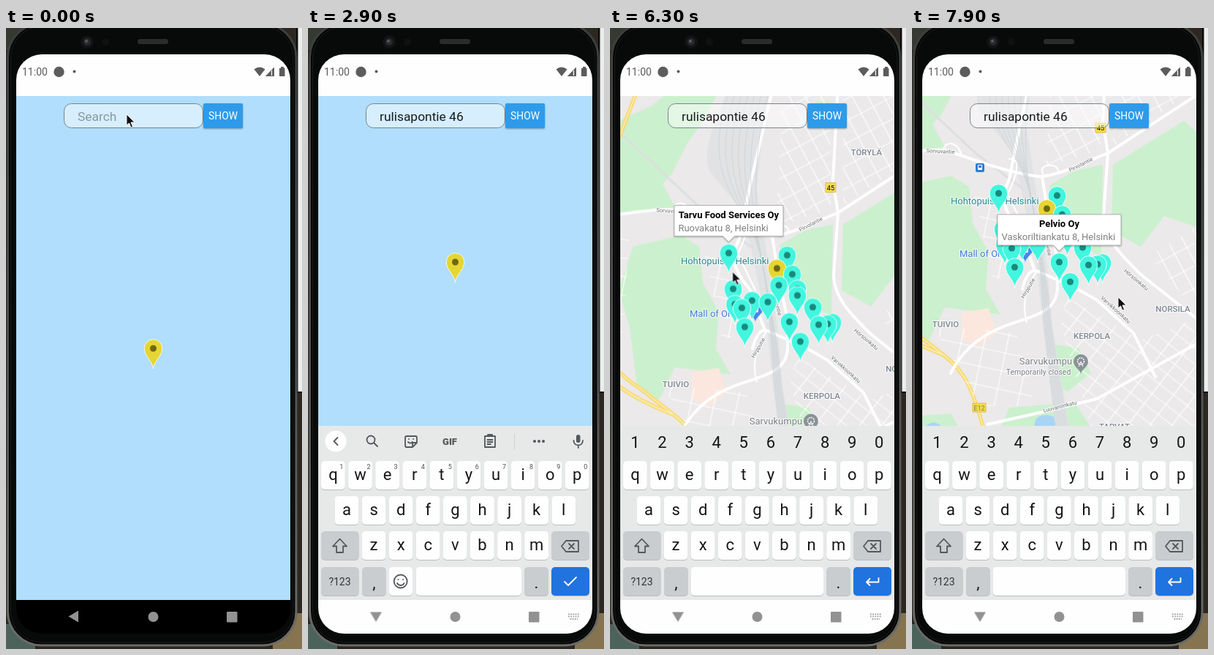
Recreate the animation shown at these times as an HTML page. Size 405 by 849 pixels, loop 8000 ms.

```html
<!DOCTYPE html>
<html lang="en">
<head>
<meta charset="utf-8">
<title>Map search on a phone</title>
<style>
html, body { margin: 0; height: 100%; overflow: hidden; background: #111; }
svg { display: block; width: 100%; height: 100%; }
text { font-family: Roboto, "Noto Sans", sans-serif; white-space: pre; }
.mid { text-anchor: middle; }
.line { fill: none; stroke-linecap: round; stroke-linejoin: round; }

.key { fill: #fefefe; filter: drop-shadow(0 1px 0 #b9bcbe); }
.key.alt { fill: #c9cdd0; }
.key.go { fill: #2173df; }
.letter { font-size: 22px; fill: #161616; text-anchor: middle; }
.hint { font-size: 9px; fill: #4c4f52; text-anchor: middle; }
.icon { fill: none; stroke: #54585b; stroke-width: 1.8; stroke-linecap: round; stroke-linejoin: round; }
.icon.light { stroke: #fff; }
.word { font-size: 14px; fill: #333; text-anchor: middle; }

.road { stroke: #fff; stroke-width: 4; }
.slim { stroke-width: 2.2; }
.motorway { stroke: #f9da72; stroke-width: 5.5; }
.median { stroke: #fdf1c4; stroke-width: 1.2; }
.label { paint-order: stroke; stroke: #fffc; stroke-width: 2px; text-anchor: middle; }
.area { font-size: 11.5px; font-weight: 500; fill: #7b8691; }
.street { font-size: 7.5px; fill: #666b70; }
.place { font-size: 13px; text-anchor: start; }

.loop { animation: 8s linear infinite; }
.pan { animation-name: pan; }
.keyboard { animation-name: slide; }
.back { animation-name: turn; transform-origin: 93px 804.5px; }
.pointer { animation-name: point; }
.land { animation-name: land; }
.features { animation-name: features; }
.poi { animation-name: poi; }
.fine { animation-name: fine; }

@keyframes pan {
  0%, 73.9% { transform: translate(0, 0); animation-timing-function: ease-in-out; }
  84.8%, 91.4% { transform: translate(66px, 21px); animation-timing-function: ease-in-out; }
  98.5%, 100% { transform: translate(-17px, -73px); }
}
@keyframes slide {
  0%, 2% { transform: translateY(238px); animation-timing-function: ease-out; }
  4.8%, 100% { transform: none; }
}
@keyframes turn {
  0%, 5% { transform: none; }
  7.5%, 100% { transform: rotate(-90deg); }
}
@keyframes point {
  0% { transform: translate(165px, 118px); animation-timing-function: step-end; }
  61% { transform: translate(114px, 317px); animation-timing-function: step-end; }
  64.8% { transform: translate(120px, 276px); animation-timing-function: step-end; }
  67.3% { transform: translate(126px, 293px); animation-timing-function: step-end; }
  69.7%, 77% { transform: translate(133px, 311px); }
  85% { transform: translate(290px, 412px); animation-timing-function: step-end; }
  86.1% { transform: translate(294px, 416px); animation-timing-function: step-end; }
  88.6%, 93.5% { transform: translate(284px, 407px); }
  98.5%, 100% { transform: translate(282px, 368px); }
}
@keyframes land { 0%, 41.5% { opacity: 0; } 46%, 100% { opacity: 1; } }
@keyframes features { 0%, 43% { opacity: 0; } 48.75% { opacity: .6; } 53%, 100% { opacity: 1; } }
@keyframes poi { 0%, 45% { opacity: 0; } 48.75% { opacity: .4; } 53%, 100% { opacity: 1; } }
@keyframes fine { 0%, 49.5% { opacity: 0; } 54%, 100% { opacity: 1; } }
</style>
</head>
<body>
<svg viewBox="0 0 405 849">
  <defs>
    <clipPath id="screen"><rect x="14" y="36" width="375" height="792" rx="35"/></clipPath>
    <clipPath id="view"><rect x="14" y="93" width="375" height="689"/></clipPath>
    <radialGradient id="warm"><stop stop-color="#f7dc94"/><stop offset="1" stop-color="#efece6" stop-opacity="0"/></radialGradient>
    <linearGradient id="rim" x2="0" y2="1"><stop stop-color="#3c3e3c"/><stop offset=".5" stop-color="#4c4e4d"/><stop offset="1" stop-color="#6a6b68"/></linearGradient>
    <pattern id="blocksA" width="19" height="27" patternUnits="userSpaceOnUse" patternTransform="rotate(-28)"><path d="M0 1H19M1 0V27" stroke="#fff" stroke-width="1.2"/></pattern>
    <pattern id="blocksB" width="24" height="17" patternUnits="userSpaceOnUse" patternTransform="rotate(38)"><path d="M0 1H24M1 0V17" stroke="#fff" stroke-width="1.2"/></pattern>
    <pattern id="blocksC" width="31" height="25" patternUnits="userSpaceOnUse" patternTransform="rotate(12)"><path d="M0 1H31M1 0V25" stroke="#fff" stroke-width="1.2"/></pattern>
  </defs>

  <!-- desk and phone body -->
  <path fill="#2d2722" d="M0 0H405V849H0Z"/>
  <path fill="#4c635c" d="M0 815H40V849H0Z"/>
  <path fill="#85744f" d="M365 800H405V849H365Z"/>
  <path fill="#343a32" d="M0 0H60V30H0Z"/>
  <path fill="#0b0b0b" d="M397 0H405V499H397Z"/>
  <path fill="#eceded" d="M399.5 0H405V497H399.5Z"/>
  <rect x="2.500" y="-6" width="394.500" height="850" rx="46" fill="#050505" stroke="url(#rim)" stroke-width="3"/>
  <rect x="6.500" y="-2" width="386.500" height="842" rx="42" fill="#080909" stroke="#1c1d1d"/>
  <circle cx="111" cy="19" r="9" fill="#121314"/><circle cx="111" cy="19" r="5" fill="#272a2c"/><circle cx="110" cy="18" r="2" fill="#575c60"/>
  <circle cx="136" cy="19" r="5" fill="#101010"/>
  <rect x="180" y="15" width="42" height="7" rx="3.500" fill="#2a2b2b"/>

  <g clip-path="url(#screen)">
    <path fill="#fefefe" d="M14 36H389V93H14Z"/>
    <g fill="#5c5c5c">
      <text x="22" y="65" font-size="14">11:00</text>
      <circle cx="72.500" cy="60" r="7.200"/><circle cx="93.500" cy="59.500" r="2"/>
      <path d="M339.500 56.500Q347 50.500 354.500 56.500L347 66Z M367 53.500V66H354.800Z M374 55h2v-2h4v2h1.500V66H374Z"/>
    </g>
    <path stroke="#fff" stroke-width="1.200" d="M363.500 58V65"/>

    <g clip-path="url(#view)">
      <path fill="#b0defc" d="M14 93H389V782H14Z"/>
      <path class="loop land" fill="#ebe9ea" d="M14 93H389V782H14Z"/>
      <g class="loop pan">
        <g class="loop features line">
          <path fill="#cbf0cd" d="M-52 150L-20 120 30 98 62 72H125L100 120 78 150 58 190 45 205 62 236-52 250Z M5 290L70 275 95 290 100 340 122 380 118 430 138 465 62 455 40 500 10 480 0 400-15 350Z M205 288L240 268 278 260 276 385 245 370 215 340Z M292 260L389 200 406 215V345L362 330 330 372 290 350Z M205 505L245 510 262 545 230 570 205 560Z M150 592L240 585 260 617H140Z M31 603L70 600 80 617H31Z M255 92L285 94 278 112 258 108Z M372 128L406 110V165L380 160Z"/>
          <path fill="#fbe7de" d="M85 462L122 456 132 490 108 510 84 498Z M-52 505L-25 500-15 530H-52Z"/>
          <path fill="#a9d5f5" d="M185 617C182 596 218 598 222 617Z M36 617Q45 608 57 617Z"/>
          <path fill="#e0e2e4" d="M134 72H196L180 150 174 210 186 290 202 400 209 480 232 617H213L196 480 188 400 166 290 152 240 108 185C98 150 124 110 134 72Z"/>
          <path stroke="#dcdfe1" stroke-width="3" d="M-52 100L14 160 105 245 168 292"/>
          <g id="motorways"></g>
          <path class="road" d="M-52 250C0 246 40 236 65 241 100 252 150 272 192 276 220 274 250 258 285 244L406 165M196 72L165 205 150 280C133 312 150 330 165 350L185 405M195 276L205 340 216 390V430C214 465 175 468 140 482S82 520 70 545M285 72L278 200 285 244 279 330C280 362 305 385 330 410L406 470M168 430C172 412 180 402 188 405L240 428 270 445 320 490 350 550M120 615L200 597 270 580 406 505"/>
          <path class="road slim" d="M60 240C62 225 82 230 84 246M196 272C188 256 224 258 216 272M150 252C166 250 162 272 148 300L172 350M188 405C170 432 168 455 174 475"/>
          <g data-on="0-4150">
            <path fill="#eeece7" d="M14 430H389V544H14Z"/>
            <ellipse cx="10" cy="500" rx="130" ry="65" fill="url(#warm)"/>
            <ellipse cx="265" cy="165" rx="120" ry="75" fill="url(#warm)" opacity=".4"/>
          </g>
        </g>
        <g class="loop fine">
          <path fill="url(#blocksA)" d="M292 72H406V155L292 235Z M210 72H275V240L200 262Z M340 385L406 345V460Z"/>
          <path fill="url(#blocksB)" d="M228 440L330 500 406 470V617H262L220 480Z"/>
          <path fill="url(#blocksC)" d="M-52 260H0L-10 420-52 390Z M45 480L160 490 185 590H110Z M100 290L142 292 160 400 128 420Z"/>
          <g id="rails" class="line" stroke="#cfd3d6" stroke-width=".8"></g>
          <g id="names"></g>
          <path fill="#fbdc4c" stroke="#d5ac28" stroke-width=".7" d="M268 203H282V216H268Z M100 586H118V598H100Z"/>
          <text class="mid" x="275" y="213" font-size="9">45</text>
          <text class="mid" x="109" y="595.500" font-size="9" fill="#5f8a3c">E12</text>
        </g>
        <g class="loop poi">
          <rect x="104" y="258" width="12" height="12" rx="2" fill="#2d7bd8"/>
          <path fill="#fff" d="M107 260H113V267H107Z"/><path fill="#2d7bd8" d="M108 261H112V264H108Z"/>
          <path fill="#4688ec" d="M172 393C171 386 162 383 162 376A10 10 0 0 1 182 376C182 383 173 386 172 393Z"/>
          <path fill="#fff" d="M168 374H176V380H168Z"/>
          <path fill="#8b9297" d="M248 546C247 539 238 537 238 529A10 10 0 0 1 258 529C258 537 249 539 248 546Z"/>
          <circle cx="248" cy="528.500" r="4.500" fill="none" stroke="#fff" stroke-width="1.500" stroke-dasharray="2 1"/>
          <path stroke="#fff" d="M248 529L245 536M248 529L251 536"/>
          <g fill="#7a7f83">
            <text class="label" x="200" y="533" font-size="13">Sarvukumpu</text>
            <text class="label" x="190" y="547" font-size="10.500">Temporarily closed</text>
          </g>
        </g>
        <g id="pins"></g>
        <g id="callouts"></g>
      </g>

      <g class="loop keyboard">
        <path fill="#e7e9e9" d="M14 544H389V782H14Z"/>
        <g data-on="0-3050">
          <circle cx="38" cy="565" r="14.500" fill="#fff"/>
          <path class="icon" data-on="0-700,2600-3050" d="M40.500 560L35.500 565 40.500 570"/>
          <path class="icon" data-on="700-2600" d="M36 560L41 565 36 570"/>
          <g class="icon" data-on="0-700,2600-3050">
            <circle cx="86" cy="563" r="5.500"/><path d="M90 567L95 572"/>
            <path d="M135 558H147Q149 558 149 560V567L143 573H135Q133 573 133 571V560Q133 558 135 558ZM149 567H143V573M137 566Q140 569 143 566M138 562h.100M144 562h.100"/>
            <path d="M242 558H256V573H242ZM246 558V556H252V558M245.500 563H252.500M245.500 566H252.500M245.500 569H250"/>
            <path stroke="#cfd2d3" stroke-width="1" d="M282.500 555V576"/>
            <path stroke-width="4" d="M310 565h.010M316 565h.010M322 565h.010"/>
            <text class="mid" x="194" y="570" font-size="13" font-weight="900" fill="#54585b" stroke="none">GIF</text>
          </g>
          <g data-on="700-2600">
            <text class="word" x="110" y="570"></text><text class="word" x="203" y="570"></text><text class="word" x="297" y="570"></text>
            <path stroke="#cfd2d3" d="M157 556V575M250 556V575"/>
          </g>
          <rect x="367" y="556" width="5.500" height="11" rx="2.700" fill="#54585b"/>
          <path class="icon" d="M363.500 564C363.500 572.500 376 572.500 376 564M369.800 570.500V574"/>
        </g>
        <g id="keys"></g>
      </g>
    </g>

    <!-- search bar -->
    <rect x="79.500" y="103.500" width="190" height="33" rx="10" fill="#fff" fill-opacity=".48" stroke="#73858d"/>
    <text x="98" y="127" font-size="17.400" fill="#8899a2" data-on="0-400">Search</text>
    <text id="query" x="98" y="127" font-size="17.400" fill="#171a1c"></text>
    <path id="compose" stroke="#171a1c" data-on="400-2200"/>
    <rect id="caret" y="109" width="2" height="23" fill="#20d6be" data-on="100-2800"/>
    <rect x="270" y="103" width="54" height="34" rx="2" fill="#2e9bea" style="filter:drop-shadow(0 1px 1px #0005)"/>
    <rect x="270" y="103" width="54" height="34" rx="2" fill="#2a8edb" data-on="3000-5800"/>
    <text class="mid" x="297" y="125" font-size="13.800" fill="#fff">SHOW</text>

    <!-- navigation bar -->
    <path fill="#000" d="M14 782H389V828H14Z"/>
    <path fill="#fefefe" data-on="200-8000" d="M14 782H389V828H14Z"/>
    <g fill="#929292">
      <path class="loop back" d="M85.500 804.500L99 796.500V812.500Z"/>
      <circle cx="201.500" cy="805" r="7"/><rect x="302" y="798" width="14.500" height="14.500" rx="1"/>
    </g>
    <path data-on="300-8000" fill="none" stroke="#a2a2a2" stroke-width="1.800" stroke-dasharray="1.800 1.400" d="M356 801.500H371M356 804.700H371M358.500 808H369"/>
  </g>

  <path class="loop pointer" data-on="0-300,4900-8000" fill="#111" stroke="#fff" stroke-width=".9" d="M0 0V15L3.500 12 6 18 8.500 17 6 11H11Z"/>
</svg>
<script>
const $ = s => document.querySelector(s);
const fill = (id, parts) => { $(id).innerHTML = parts.join(''); };

const highway = 'M12 72L-12 135-52 224M-52 415C-30 450-8 470 14 484L60 520C92 544 100 570 114 617M-52 445C-25 480 10 500 60 520';
fill('#motorways', ['motorway', 'median'].map(kind => `<path class="${kind}" d="${highway}"/>`));

// map labels: text, x, y, turn, kind, time shown
const names = [
  ['TÖRYLÄ', 324, 165, 0, 'area'], ['NORSILA', 374, 461, 0, 'area'],
  ['KERPOLA', 263, 498, 0, 'area'], ['TUIVIO', 63, 482, 0, 'area'],
  ['TARVAT', 294, 622, 0, 'area'], ['VESKANSUO', -13, 335, 0, 'area', '6900-8000'],
  ['Nuosela', 50, 79, 0, 'street', '6900-8000'],
  ['Sorvuvantie', 56, 244, 3, 'street'], ['Pirvolantie', 249, 262, -27, 'street'],
  ['Hörsöinkatu', 322, 419, 40, 'street'], ['Varvikkoonkatu', 294, 460, 42, 'street'],
  ['Hirpputie', 178, 430, -60, 'street'], ['Rulisapontie', 198, 365, 75, 'street'],
  ['Luuvaroinkatu', 220, 593, -14, 'street']
];
fill('#names', [
  ...names.map(([s, x, y, r, kind, on = '0-8000']) =>
    `<text class="label ${kind}" transform="translate(${x} ${y}) rotate(${r})" data-on="${on}">${s}</text>`),
  '<text class="label place" x="70" y="314" fill="#2a8590">Hohtopuisto Helsinki</text>',
  '<text class="label place" x="82" y="386" fill="#3c78d0">Mall of Orvela</text>'
]);

fill('#rails', Array.from({ length: 7 }, (_, i) =>
  `<path d="M${138 + i * 9} 72C${112 + i * 10} 150 ${118 + i * 9} 190 ${155 + i * 3} 245S${190 + i * 2} 390 ${198 + i * 1.5} 480L${214 + i * 2.5} 617"/>`));

const pin = (x, y, body, dot) => `<g transform="translate(${x} ${y})">
  <path fill="${body}" stroke="#fff" stroke-opacity=".8" d="M0 28C-1 17-12.300 11-12.300 0A12.300 12.300 0 0 1 12.300 0C12.300 11 1 17 0 28Z"/>
  <circle r="4.500" fill="${dot}"/></g>`;
const spots = [
  [135.5, 299], [215.5, 302], [222.5, 328], [204, 343], [229.5, 348], [141.5, 348],
  [229.5, 357], [167.5, 364], [189, 366], [144, 369], [250.5, 373], [153.5, 374],
  [218.5, 393], [277.5, 394], [271, 396], [258.5, 397], [157.5, 400], [233.5, 420]
];
const teal = spots.map(([x, y]) => pin(x, y, '#42f5df', '#19897c'));
const shown = list => `<g data-on="4700-8000">${list.join('')}</g>`;
fill('#pins', [
  shown(teal.slice(0, 2)),
  `<g id="home">${pin(201.5, 320, '#e5d633', '#70680f')}</g>`,
  shown(teal.slice(2))
]);

const callout = (x, y, w, title, sub, on) => `<g transform="translate(${x} ${y})" data-on="${on}">
  <path fill="#fff" stroke="#a2a2a2" stroke-width=".8" style="filter:drop-shadow(0 1px 1px #0004)"
    d="M${-w / 2}-65H${w / 2}V-23H8L0-15-8-23H${-w / 2}Z"/>
  <text class="mid" y="-48" font-size="13" font-weight="700" fill="#000">${title}</text>
  <text x="${5.5 - w / 2}" y="-30" font-size="13" fill="#808080">${sub}</text></g>`;
fill('#callouts', [
  callout(135.5, 299, 149, 'Tarvu Food Services Oy', 'Ruovakatu 8, Helsinki', '5950-7350'),
  callout(218.5, 393, 169, 'Pelvio Oy', 'Vaskoriltiankatu 8, Helsinki', '7350-8000')
]);

const WORDS = '0-3050', DIGITS = '3050-8000';
const key = (x, y, w, kind = '') => `<rect class="key ${kind}" x="${x}" y="${y}" width="${w}" height="39" rx="5"/>`;
const letter = (s, x, y) => `<text class="letter" x="${x}" y="${y}">${s}</text>`;
const row = (s, x, y) => [...s].map((c, i) => key(x + i * 37.1 - 16.4, y, 32.8) + letter(c, x + i * 37.1, y + 26)).join('');
const digits = [...'1234567890'].map((c, i) => [c, 34.4 + i * 37.1]);
fill('#keys', [
  row('qwertyuiop', 34.4, 592), row('asdfghjkl', 53, 640), row('zxcvbnm', 90, 688),
  `<g data-on="${WORDS}">`, ...digits.map(([c, x]) => `<text class="hint" x="${x + 11.5}" y="603">${c}</text>`), '</g>',
  `<g data-on="${DIGITS}">`, ...digits.map(([c, x]) => letter(c, x, 574)), '</g>',
  key(18, 688, 51.5, 'alt'), key(333, 688, 52, 'alt'),
  '<path class="icon" d="M43.500 698.500L34 708.500H39V717H48V708.500H53Z"/>',
  '<path class="icon" d="M353 701H370V716H353L347 708.500ZM357 705L364 712M364 705L357 712"/>',
  key(18, 737, 51.5, 'alt'), key(74, 737, 32.8, 'alt'), key(296, 737, 33, 'alt'), key(333, 737, 52, 'go'),
  '<text class="mid" x="43.500" y="762" font-size="14" fill="#333">?123</text>',
  letter(',', 90.5, 766), letter('.', 312.5, 766),
  `<g data-on="${WORDS}">`, key(110.5, 737, 32.5), key(147.5, 737, 144.5),
  '<g class="icon"><circle cx="126.700" cy="756.500" r="9"/><path d="M122 759C124 763 130 763 131.500 759M123.500 754h.100M130 754h.100"/></g>',
  '<path class="icon light" d="M351 757L356 762 367 751"/></g>',
  `<g data-on="${DIGITS}">`, key(110.5, 737, 181.5),
  '<path class="icon light" d="M367.500 752V757.500H351M355.500 753L351 757.500 355.500 762"/></g>'
]);

const phrase = 'rulisapontie 46', nameLength = 12;
// moments at which each further character is typed
const strokes = [400, 500, 700, 900, 1000, 1200, 1300, 1400, 1500, 1600, 1700, 1800, 2000, 2600, 2600];
const query = $('#query'), words = document.querySelectorAll('.word');
const timed = [...document.querySelectorAll('[data-on]')].map(el =>
  [el, el.dataset.on.split(',').map(span => span.split('-').map(Number))]);

let start;
function draw(now) {
  start ??= now;
  const t = (now - start + 15) % 8000;
  // visibility, unlike display, leaves running animations alone
  for (const [el, spans] of timed)
    el.style.visibility = spans.some(([a, b]) => t >= a && t < b) ? '' : 'hidden';

  const typed = strokes.filter(at => t >= at).length;
  query.textContent = phrase.slice(0, typed);
  const stem = phrase.slice(0, Math.min(typed, nameLength));
  const guesses = t < 2400 ? [stem.slice(0, -1), stem, stem + 'n'] : ['ja', 'on', 'oli'];
  words.forEach((el, i) => { el.textContent = guesses[i]; });

  const width = n => n > 0 ? query.getSubStringLength(0, n) : 0;
  const composed = typed < 3 ? Math.min(typed, 1) : stem.length;
  $('#caret').setAttribute('x', 98 + width(typed));
  $('#compose').setAttribute('d', `M98 129.500H${98 + width(composed)}`);
  $('#home').setAttribute('transform', `translate(0 ${t < 300 ? 118 : 0})`);
  requestAnimationFrame(draw);
}
requestAnimationFrame(draw);
</script>
</body>
</html>
```
